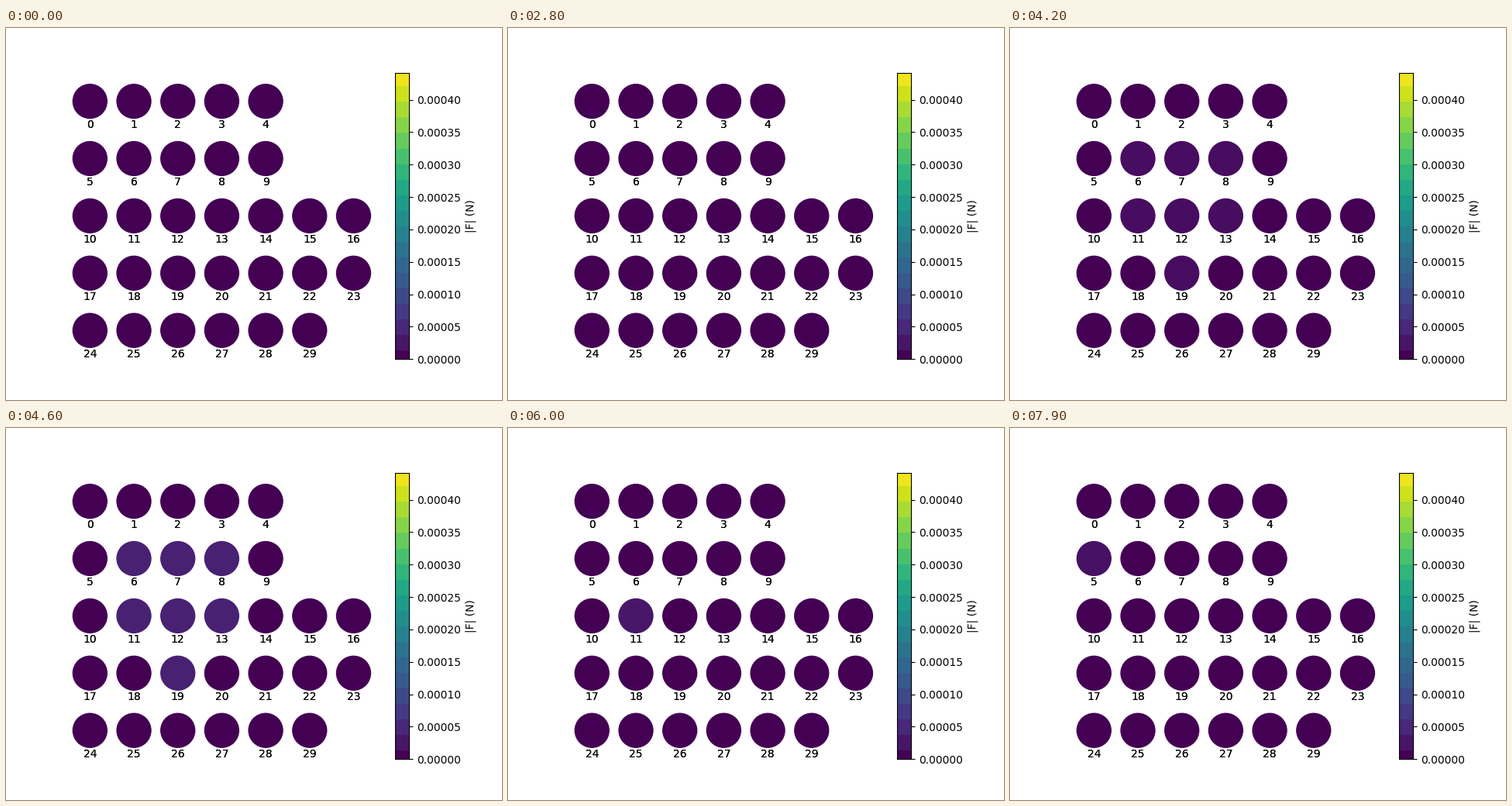
Write a matplotlib script that moves like this. It is 640x480 px and loops after 8 s.

```python
import numpy as np
import matplotlib.pyplot as plt
from matplotlib.animation import FuncAnimation

WIDTH, HEIGHT, DPI = 640, 480, 100
FRAMES, INTERVAL = 80, 100
ROW_LENGTHS = (5, 5, 7, 7, 6)
MAX_FORCE = 0.0004418
FADE = 0.5
BANDS = 19

# Contacts: column, row, radius in cells, start and end in seconds, strength
CONTACTS = [
    (3, 1, 0.5, 3.0, 4.2, 0.58),
    (4, 2, 0.5, 3.0, 4.2, 0.18),
    (3, 2, 0.5, 3.0, 4.2, 0.055),
    (2, 1.7, 1.4, 4.0, 5.2, 0.09),
    (1, 2, 0.5, 4.8, 7.4, 0.06),
    (2, 2, 0.5, 4.8, 6.0, 0.04),
    (0, 1, 0.5, 7.4, 8.6, 0.045),
]

cells = [(col, row) for row, n in enumerate(ROW_LENGTHS) for col in range(n)]
cols, rows = np.array(cells).T


def envelope(time, start, end):
    """Ease in after the start and out before the end."""
    p = np.clip(min(time - start, end - time) / FADE, 0, 1)
    return p * p * (3 - 2 * p)


def forces(frame):
    time = frame * INTERVAL / 1000
    levels = np.zeros(len(cells))
    for x, y, radius, start, end, strength in CONTACTS:
        touched = np.hypot(cols - x, rows - y) < radius
        levels = np.maximum(levels, touched * strength * envelope(time, start, end))
    return levels * MAX_FORCE


plt.rcParams["font.family"] = "DejaVu Sans"
fig = plt.figure(figsize=(WIDTH / DPI, HEIGHT / DPI), dpi=DPI, facecolor="white")

ax = fig.add_axes([0.125, 0.11, 0.62, 0.77])
ax.set(xlim=(-0.5, 6.5), ylim=(4.5, -0.5))
ax.axis("off")
dots = ax.scatter(cols, rows, s=1000, c=forces(0), cmap="viridis",
                  vmin=0, vmax=MAX_FORCE)
for number, cell in enumerate(cells):
    for _ in range(2):  # doubled for the heavier label weight
        ax.annotate(str(number), cell, xytext=(0, -25),
                    textcoords="offset points", ha="center")

bar_height = 0.77 * HEIGHT
bar = fig.add_axes([501.6 / WIDTH, 0.11, bar_height / 20 / WIDTH, 0.77])
edges = np.concatenate([[0], np.linspace(0.03, 0.952, BANDS - 1), [1]])
shades = (edges[:-1] + edges[1:]) / 2
shades[0] = 0
bar.pcolormesh([0, 1], edges * MAX_FORCE, shades[:, None],
               cmap="viridis", vmin=0, vmax=1)
bar.set(xlim=(0, 1), ylim=(0, MAX_FORCE), xticks=[])
ticks = np.arange(9) * 0.00005
bar.set_yticks(ticks, [f"{t:.5f}" for t in ticks])
bar.yaxis.tick_right()
bar.yaxis.set_label_position("right")
bar.set_ylabel("|F| (N)")


def update(frame):
    dots.set_array(forces(frame))
    return (dots,)


anim = FuncAnimation(fig, update, frames=FRAMES, interval=INTERVAL,
                     repeat=True, repeat_delay=0, blit=False)
plt.show()
```
